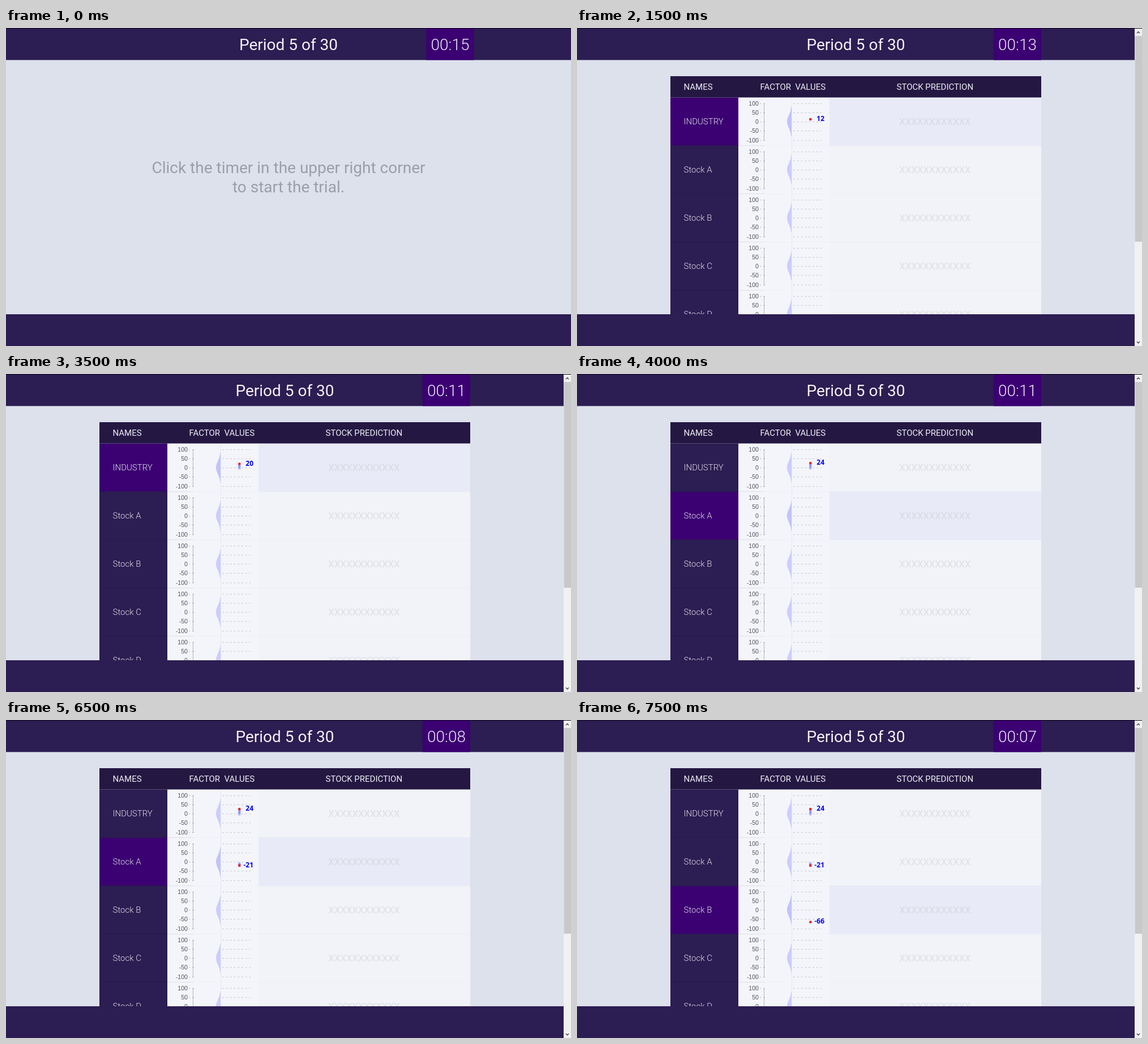
An HTML page with a canvas for the animation above (8 s loop, 998 by 561 pixels).

```html
<!DOCTYPE html>
<html lang="en">
<head>
<meta charset="utf-8">
<style>
  html, body { margin: 0; width: 100%; height: 100%; overflow: hidden; background: #dde1ec; }
  canvas { display: block; }
</style>
</head>
<body>
<canvas id="stage" width="998" height="561"></canvas>
<script>
const ctx = document.getElementById('stage').getContext('2d');
const LOOP = 8000, STEP = 500, ROW_H = 85, TABLE_TOP = 122.5;
const BAR = '#2c1d52', ACTIVE = '#3b0072';

// start: when the row is selected; first: when its first value appears
const rows = [
  { name: 'INDUSTRY', start: 1500, end: 4000, first: 1500, values: [12, 3, -5, 8, 20, 24] },
  { name: 'Stock A', start: 4000, end: 7000, first: 4500, values: [-10, -14, -17, -19, -21] },
  { name: 'Stock B', start: 7000, end: LOOP, first: 7500, values: [-66] },
  { name: 'Stock C' },
  { name: 'Stock D' }
];

function rect(x, y, w, h, color) {
  ctx.fillStyle = color;
  ctx.fillRect(x, y, w, h);
}

function text(str, x, y, font, color, align = 'left') {
  ctx.font = font;
  ctx.fillStyle = color;
  ctx.textAlign = align;
  ctx.fillText(str, x, y);
}

function line(x1, y1, x2, y2, color, dash = []) {
  ctx.strokeStyle = color;
  ctx.lineWidth = 1;
  ctx.setLineDash(dash);
  ctx.beginPath();
  ctx.moveTo(x1, y1);
  ctx.lineTo(x2, y2);
  ctx.stroke();
}

function bell(cy, color) {
  ctx.fillStyle = color;
  ctx.beginPath();
  ctx.moveTo(379, cy - 26);
  for (let d = -26; d <= 26; d++) ctx.lineTo(379 - 8 * Math.exp(-d * d / 260), cy + d);
  ctx.lineTo(379, cy + 26);
  ctx.fill();
}

function chart(cy, active) {
  bell(cy, active ? '#c2c2fb' : '#ccccfe');
  line(379.5, cy - 42, 379.5, cy + 42, '#e6e7f0');
  line(330.5, cy - 32, 330.5, cy + 33, '#b4b4ba');
  for (let v = 100; v >= -100; v -= 50) {
    const y = Math.round(cy - v * 0.325) + 0.5;
    text(v, 321, y + 3.5, '10.6px "Liberation Sans", Arial, sans-serif', '#55555c', 'right');
    line(323.5, y, 325, y, '#aaaab0');
    line(329, y, 332, y, '#aaaab0');
    line(382, y, 432, y, '#c6c7ce', [3, 3.8]);
  }
}

function points(row, cy, t) {
  if (!row.values || t < row.first) return;
  const shown = row.values.slice(0, Math.floor((t - row.first) / STEP) + 1);
  const last = shown.pop();
  const yOf = v => cy - v * 0.325;
  for (const v of shown) rect(410.3, yOf(v) - 2, 4, 4, 'rgba(80,80,255,.32)');
  rect(410.3, yOf(last) - 2, 4, 4, '#f01820');
  text(last, 437, yOf(last) + 3, 'bold 12px "Open Sans", sans-serif', '#0000f0', 'right');
}

function drawRow(row, i, t) {
  const y = TABLE_TOP + i * ROW_H, cy = y + 42.5;
  const active = t >= row.start && t < row.end;
  rect(165, y, 120, ROW_H, active ? ACTIVE : BAR);
  rect(285, y, 161, ROW_H, active ? '#f4f5fb' : '#f4f5fa');
  rect(446, y, 374, ROW_H, active ? '#e8ebf7' : '#f1f3f8');
  if (i) {
    line(165, y, 285, y, '#281a4b');
    line(285, y, 331, y, '#e0e1e8');
  }
  text(row.name, 188.5, cy + 5.2, '300 15px Roboto, sans-serif', '#e2dfeb');
  chart(cy, active);
  points(row, cy, t);
  text('X'.repeat(12), 632.5, cy + 6, '16.8px Roboto, sans-serif', active ? '#d7d9e3' : '#dddfe5', 'center');
}

function table(t) {
  ctx.save();
  ctx.beginPath();
  ctx.rect(165, 85, 655, 420);
  ctx.clip();
  rows.forEach((row, i) => drawRow(row, i, t));
  rect(165, 85, 655, 37.5, '#241843');
  const font = '15px Roboto, sans-serif';
  text('NAMES', 188.5, 108.5, font, '#f0eef5');
  text('FACTOR', 378, 108.5, font, '#f0eef5', 'right');
  text('VALUES', 385.5, 108.5, font, '#f0eef5');
  text('STOCK PREDICTION', 632.3, 108.5, font, '#f0eef5', 'center');
  ctx.restore();
}

function chevron(y, dir) {
  ctx.strokeStyle = '#505050';
  ctx.lineWidth = 1.5;
  ctx.setLineDash([]);
  ctx.beginPath();
  ctx.moveTo(989, y + dir);
  ctx.lineTo(991.5, y - dir);
  ctx.lineTo(994, y + dir);
  ctx.stroke();
}

function scrollbar() {
  rect(985, 0, 13, 561, '#f1f1f1');
  rect(985.5, 14, 12.5, 363, '#c8c8c8');
  chevron(8, 1.3);
  chevron(554.5, -1.3);
}

function draw(t) {
  const started = t >= STEP;
  const width = started ? 985 : 998, mid = width / 2;
  const seconds = started ? 14 - Math.floor((t - STEP) / 1000) : 15;

  rect(0, 0, 998, 561, '#dde1ec');
  if (started) {
    table(t);
  } else {
    const font = '28px Roboto, sans-serif';
    text('Click the timer in the upper right corner', mid, 256, font, '#9c9ea8', 'center');
    text('to start the trial.', mid, 290, font, '#9c9ea8', 'center');
  }
  rect(0, 0, width, 56.5, BAR);
  rect(0, 505, width, 56, BAR);
  rect(mid + 243.3, 0, 84, 56.5, ACTIVE);
  text('Period 5 of 30', mid, 39, '28px Roboto, sans-serif', '#f4f2f8', 'center');
  text('00:' + String(seconds).padStart(2, '0'), mid + 285.5, 39, '300 28px Roboto, sans-serif', '#f0eaf6', 'center');
  if (started) scrollbar();
  rect(0, 0, 998, 1, '#0c0818');
}

function frame() {
  draw(performance.now() % LOOP);
  requestAnimationFrame(frame);
}
frame();
</script>
</body>
</html>
```
